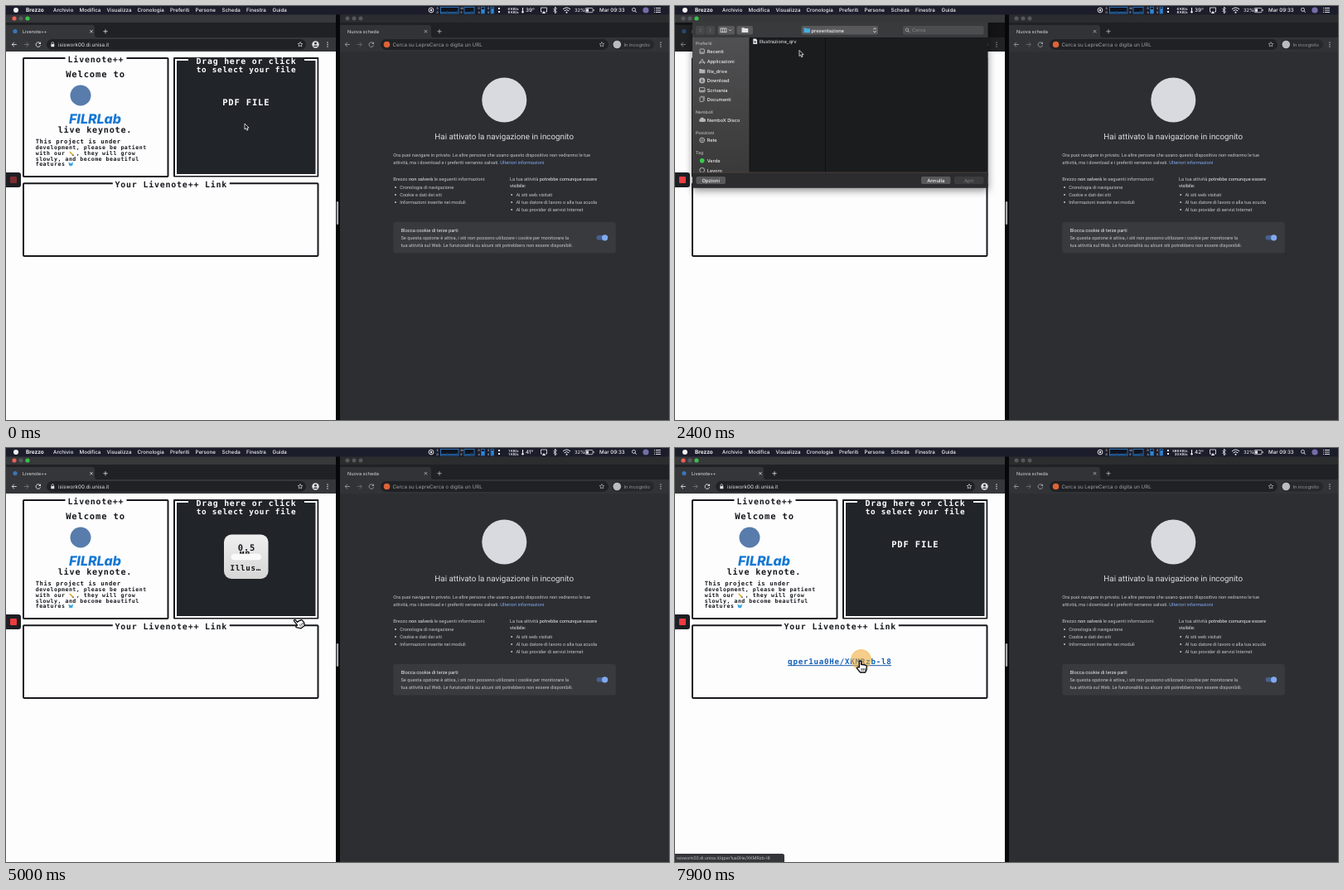
These frames come from a looping animation (800 px wide and 500 px high, 8000 ms). An HTML page:

```html
<!DOCTYPE html>
<html lang="it">
<head>
<meta charset="utf-8">
<title>Livenote++</title>
<style>
  html, body { margin: 0; width: 100%; height: 100%; overflow: hidden; background: #000; }
  svg { display: block; width: 800px; height: 500px; }
  text { white-space: pre; text-rendering: geometricPrecision; }
  .ui { font-family: Inter, "Open Sans", sans-serif; }
  .page { font-family: Roboto, Inter, sans-serif; }
  .px { font-family: "DejaVu Sans Mono", "Liberation Mono", monospace; font-weight: 700; letter-spacing: .08em; }
  .slide { font-family: "Liberation Sans", Lato, sans-serif; font-weight: 700; }
  .b { font-weight: 600; }
  .sheet { filter: drop-shadow(0 3px 5px rgba(0, 0, 0, .45)); }
</style>
</head>
<body>
<svg id="stage" viewBox="0 0 800 500"></svg>
<script>
const LOOP = 8000, STEP = 100, INK = '#17191d', TITLE_BAR = '#37383a', OFF = '#55575b';

// Markup helpers
const rect = (x, y, w, h, fill, rx = 0, more = '') =>
  `<rect x="${x}" y="${y}" width="${w}" height="${h}" rx="${rx}" fill="${fill}" ${more}/>`;
const dot = (x, y, r, fill, more = '') => `<circle cx="${x}" cy="${y}" r="${r}" fill="${fill}" ${more}/>`;
const line = (d, color, w = 1, more = '') =>
  `<path d="${d}" fill="none" stroke="${color}" stroke-width="${w}" ${more}/>`;
const shape = (d, fill, more = '') => `<path d="${d}" fill="${fill}" ${more}/>`;
const text = (x, y, size, str, fill, cls = 'ui', more = '') =>
  `<text x="${x}" y="${y}" font-size="${size}" fill="${fill}" class="${cls}" ${more}>${str}</text>`;
const group = (id, body, more = '') => `<g id="${id}" ${more}>${body}</g>`;
const MID = 'text-anchor="middle"', END = 'text-anchor="end"';

const cross = (x, y, c) => line(`M${x - 1.7} ${y - 1.7}l3.4 3.4m0 -3.4l-3.4 3.4`, c, .8);
const plus = (x, y, c) => line(`M${x - 2.6} ${y}h5.2m-2.6 -2.6v5.2`, c, .8);
const arrow = (x, y, dir, c) =>
  line(`M${x - 2.8 * dir} ${y}h${5.6 * dir}m${-2.7 * dir} -2.7l${2.7 * dir} 2.7l${-2.7 * dir} 2.7`, c, .9);
const reload = (x, y, c) =>
  line(`M${x + 2.2} ${y - 1.5}a2.8 2.8 0 1 0 .4 2.3`, c, .9) + shape(`M${x + 3} ${y - 3.2}v2.8h-2.8z`, c);
const dots = (x, y, c) => [-2.4, 0, 2.4].map(d => dot(x, y + d, .75, c)).join('');
const star = (x, y, c) => {
  const pts = [...Array(10).keys()].map(i => {
    const a = i * Math.PI / 5 - Math.PI / 2, r = i % 2 ? 1.4 : 3;
    return `${(x + r * Math.cos(a)).toFixed(2)},${(y + r * Math.sin(a)).toFixed(2)}`;
  });
  return `<polygon points="${pts.join(' ')}" fill="none" stroke="${c}" stroke-width=".7"/>`;
};
const lens = (x, y, c, r = 2) => dot(x, y, r, 'none', `stroke="${c}" stroke-width=".8"`) +
  line(`M${x + r * .7} ${y + r * .7}l1.9 1.9`, c, .9);

function menuBar() {
  const items = [[57, 'Archivio'], [88.5, 'Modifica'], [121.5, 'Visualizza'], [158.5, 'Cronologia'], [198, 'Preferiti'],
    [228.5, 'Persone'], [260.5, 'Scheda'], [290, 'Finestra'], [321.5, 'Guida']];
  const w = '#f2f2f4', blue = '#2e86d8', med = 'font-weight="500"';
  const label = (x, y, s) => text(x, y, 3.4, s, w);
  return rect(0, 0, 800, 10.5, '#1b1d2b') + dot(12, 5, 3, w) +
    text(24, 7.4, 6.5, 'Brezzo', w, 'ui', 'font-weight="700"') +
    items.map(([x, s]) => text(x, 7.4, 6.2, s, w, 'ui', med)).join('') +
    dot(513, 5, 2.9, 'none', `stroke="${w}" stroke-width=".9"`) + dot(513, 5, 1.2, w) +
    label(519.5, 4.4, 'S') + label(519.5, 8.6, 'D') +
    rect(524.5, 1.5, 21.5, 7.5, '#10141f', 0, `stroke="${blue}" stroke-width=".8"`) +
    line('M525 8l3-.6 2 .5 3-1 2 1 3-.5 3 .4 4-.8', blue, .8) +
    label(548.5, 4.4, 'M') + label(548.5, 8.6, 'E') +
    rect(553, 1.5, 12, 7.5, '#10141f', 0, `stroke="${blue}" stroke-width=".8"`) + line('M554 7.8h6l2-1 2 .8', blue, .8) +
    rect(573.5, 1.5, 4, 7.5, '#10141f', 0, `stroke="${blue}" stroke-width=".7"`) + rect(574, 4, 3, 4.8, blue) +
    label(569.5, 4.4, 'R') + label(569.5, 8.6, 'A') +
    label(581, 4.4, 'S') + label(581, 8.6, 'S') + rect(585, 1.5, 3.5, 7.5, '#10141f', 0, `stroke="${blue}" stroke-width=".7"`) +
    rect(585.4, 3, 2.7, 5.8, blue) + rect(594, 2, 2, 2, w) + rect(594, 6, 2, 2, w) +
    text(618.5, 4.5, 4.1, '', w, 'ui b', END + ' id="up"') + text(618.5, 9, 4.1, '', w, 'ui b', END + ' id="down"') +
    dot(623.5, 7.2, 1.2, w) + line('M623.5 2v5', w, 1.1) + text(627, 7.4, 6.3, '', w, 'ui', med + ' id="temp"') +
    line('M647 7h-1.5v-5h7v5h-1.5', w, .8) + shape('M646.8 9l2.2-3 2.2 3z', w) +
    line('M660.5 3l4 4-2 2v-8l2 2-4 4', w, .8) +
    line('M672 4q4.5-4 9 0m-7.4 1.8q2.9-2.4 5.8 0', w, 1) + dot(676.5, 7.8, 1, w) +
    text(686, 7.4, 5.8, '32%', w) + rect(699, 2.5, 9, 5.2, 'none', 1, `stroke="${w}" stroke-width=".7"`) +
    rect(700, 3.5, 3, 3.2, w) + rect(708.7, 4.2, .9, 1.8, w) +
    text(716, 7.4, 6.2, 'Mar 09:33', w, 'ui', med) + lens(757.5, 4.4, w) +
    dot(772, 5, 3.6, '#746ea8') + line('M782 2.5h1m1 0h6m-8 2.5h1m1 0h6m-8 2.5h1m1 0h6', w, .9);
}

function leftChrome() {
  const c = '#dfe1e5';
  return rect(0, 20, 398, 18, '#202124') + rect(0, 10, 398, 10, TITLE_BAR) +
    shape('M0 38V23h104q3 0 3 4v8q0 3 3 3z', '#35363a') + rect(0, 38, 398, 17, '#35363a') +
    dot(10, 15, 2.6, '#ed5f57', 'id="closeLight"') + dot(18, 15, 2.6, OFF) + dot(26, 15, 2.6, '#38c149') +
    dot(11, 30.5, 2.6, '#3b76b8') + text(20, 33, 5.5, 'Livenote++', c) + cross(103, 30.7, c) + plus(120, 30.7, c) +
    rect(49, 40, 313, 13, '#202124', 6.5) + arrow(10, 46.5, -1, c) + arrow(24.5, 46.5, 1, '#75777b') + reload(39, 46.5, c) +
    rect(54.3, 46, 4, 3.2, c, .5) + line('M55.1 46v-1.2a1.2 1.2 0 0 1 2.4 0v1.2', c, .7) +
    text(63, 48.9, 6.2, 'isiswork00.di.unisa.it', c) + star(355, 46.5, c) +
    dot(373.5, 46.5, 4.2, c) + dot(373.5, 45.2, 1.4, '#35363a') + shape('M370.8 49a2.8 2.2 0 0 1 5.4 0z', '#35363a') +
    dots(388, 46.5, c);
}

function leftPage() {
  const para = ['This project is under', 'development, please be patient', 'with our   , they will grow',
    'slowly, and become beautiful', 'features'];
  const frame = (x, y, w, h) => rect(x, y, w, h, 'none', .8, `stroke="${INK}" stroke-width="2"`);
  const head = (x, y, w, s) => rect(x - w / 2, y - 5, w, 9, '#fdfdfe') + text(x, y + 3.3, 9.95, s, INK, 'px', MID);
  return rect(0, 55, 398, 445, '#fdfdfe') +
    frame(21, 63, 174.5, 143) + head(108.5, 64.5, 74, 'Livenote++') +
    text(108, 85.5, 10.5, 'Welcome to', INK, 'px', MID) + dot(90, 108, 12.5, '#587cab') +
    text(107.5, 142, 16, 'FILRLab', '#1477d4', 'ui', MID + ' font-weight="800" font-style="italic"') +
    text(107.5, 152.5, 10.1, 'live keynote.', INK, 'px', MID) +
    para.map((s, i) => text(35.7, 166.4 + i * 6.7, i ? 6.55 : 7.2, s, INK, 'px')).join('') +
    line('M77 176l3.6 4', '#e3a72e', 1.7) + dot(81, 180.2, .8, '#3d3427') +
    shape('M75.5 188.5l2.7 1.8 2.7-1.8-.5 3.8-1.5 1.2-.7-1-.7 1-1.5-1.2z', '#36a5df') +
    rect(202, 62, 175.3, 144.5, INK, .8) + rect(205, 65, 169.5, 139, '#212429', 0, 'stroke="#fdfdfe" stroke-width="2"') +
    rect(220, 62, 140, 20, '#212429') +
    text(290, 70.4, 9.85, 'Drag here or click', '#fff', 'px', MID) +
    text(290, 79.7, 9.3, 'to select your file', '#fff', 'px', MID) +
    group('pdf', text(289.8, 120.3, 10.5, 'PDF FILE', '#fff', 'px', MID)) +
    group('tile',
      rect(263, 104.5, 53.5, 53.5, 'url(#tileFill)', 9) + text(290.5, 123.5, 10.4, '0.5', '#15171a', 'px', MID) +
      text(288.5, 132, 9.8, 'MB', '#15171a', 'px', MID) + rect(271.5, 127.7, 36.5, 7.6, '#fafafa', 3.8) +
      text(289.3, 147.5, 9.2, 'Illus…', '#15171a', 'px', MID)) +
    frame(21, 214.3, 355.5, 87.6) + head(199.3, 216, 141, 'Your Livenote++ Link') +
    group('link', text(198.8, 261, 9.2, 'qper1ua0He/XKMRzb-l8', '#1684e2', 'px', MID + ' id="linkText"') +
      line('M136 262.7h125', '#1254a5', 1, 'id="underline"')) +
    group('status', rect(-3, 490, 135, 13, '#35363a', 2.5) +
      text(2, 497, 5.2, 'isiswork00.di.unisa.it/qper1ua0He/XKMRzb-l8', '#bdc1c6')) +
    group('record', shape('M0 201h15q3 0 3 3v12q0 3-3 3h-15z', '#1d1f24') + rect(5, 206, 8, 8, '#ee3b3f', 1, 'id="recordMark"'));
}

function rightWindow() {
  const c = '#b5b8bd', t = '#c3c5ca';
  const p = (x, y, s, more = '') => text(x, y, 5.68, s, t, 'page', more);
  const bullets = (x, y, list) => list.map((s, i) => dot(x, y - 2 + i * 9, 1, t) + p(x + 5.2, y + i * 9, s)).join('');
  return rect(403, 10, 397, 490, '#2d2e32') + rect(403, 20, 397, 18, '#202124') + rect(403, 10, 397, 10, '#2b2c2e') +
    shape('M403 38V23h107q3 0 3 4v8q0 3 3 3z', '#323337') + rect(403, 38, 397, 17, '#323337') +
    [412, 420, 428].map(x => dot(x, 15, 2.5, OFF)).join('') +
    text(412, 33, 5.6, 'Nuova scheda', '#d6d8dc') + cross(506.5, 30.7, c) + plus(523, 30.7, c) +
    arrow(412, 46.5, -1, '#9a9da2') + arrow(426.5, 46.5, 1, '#696b70') + reload(441, 46.5, '#9a9da2') +
    rect(452, 40, 275, 13, '#202124', 6.5) + dot(459.5, 46.5, 3.8, '#de6236') +
    text(466.5, 48.9, 6.2, 'Cerca su LepreCerca o digita un URL', '#9ea1a6') + star(719, 46.5, c) +
    rect(731, 40.5, 51, 12, '#27282b', 6) + dot(737.3, 46.5, 4.8, '#b9bcc1') +
    text(745.5, 48.7, 5.7, 'In incognito', '#94979c') + dots(790, 46.5, c) +
    dot(601.3, 113.5, 27, '#d8dadf') +
    text(601.2, 161.2, 9.8, 'Hai attivato la navigazione in incognito', '#dcdee2', 'page', MID) +
    p(467.3, 182, 'Ora puoi navigare in privato. Le altre persone che usano questo dispositivo non vedranno le tue') +
    p(467.3, 190.8, 'attività, ma i download e i preferiti verranno salvati. <tspan fill="#82aaf0">Ulteriori informazioni</tspan>') +
    p(467.3, 210.5, 'Brezzo <tspan font-weight="500">non salverà</tspan> le seguenti informazioni:') +
    bullets(470, 221, ['Cronologia di navigazione', 'Cookie e dati dei siti', 'Informazioni inserite nei moduli']) +
    p(608, 210.5, 'La tua attività <tspan font-weight="500">potrebbe comunque essere</tspan>') +
    p(608, 219.2, 'visibile:', 'font-weight="500"') +
    bullets(610.2, 230, ['Ai siti web visitati', 'Al tuo datore di lavoro o alla tua scuola', 'Al tuo provider di servizi Internet']) +
    rect(467.3, 261, 268.5, 37.5, '#393a3e', 3) + text(476.5, 273, 5.75, 'Blocca cookie di terze parti', '#e6e8eb', 'page') +
    p(476.5, 282, 'Se questa opzione è attiva, i siti non possono utilizzare i cookie per monitorare la') +
    p(476.5, 290.8, 'tua attività sul Web. Le funzionalità su alcuni siti potrebbero non essere disponibili.') +
    rect(712.5, 277, 13, 5.6, '#45618f', 2.8) + dot(722.6, 279.8, 3.6, '#82aaf0');
}

function sidebar() {
  const heads = [[47, 'Preferiti'], [130, 'NemboX'], [154.5, 'Posizioni'], [179, 'Tag']];
  const rows = [[57.2, 'Recenti'], [69, 'Applicazioni'], [80.5, 'file_drive'], [92.2, 'Download'], [103.7, 'Scrivania'],
    [115.3, 'Documenti'], [140, 'NemboX Disco'], [164.3, 'Rete'], [189, 'Verde'], [200.5, 'Lavoro']];
  const g = '#b4b4b5', ring = y => dot(32.7, y, 2.9, 'none', `stroke="${g}" stroke-width="1"`);
  return rect(21, 38, 69, 163, 'url(#sideFill)') + rect(21, 38, 69, 163, '#1d1c1b', 0, 'id="shade"') +
    heads.map(([y, s]) => text(25, y, 5.1, s, '#b0b0b1', 'ui b')).join('') +
    rows.map(([y, s]) => text(38.7, y, 5.6, s, '#f0f0f1', 'ui', 'font-weight="500"')).join('') +
    rect(30, 52, 5.4, 5.4, 'none', .8, `stroke="${g}"`) + line('M30 56h5.4', g) +
    line('M29.5 70l3.2-6 3.2 6m-7-2h7.6', g, 1) + shape('M29.3 76h2.5l.8.8h3.7v4.5h-7z', g) +
    dot(32.7, 90, 3.6, g) + line('M32.7 88v3.6m-1.6-1.4l1.6 1.6 1.6-1.6', '#454547', .9) +
    rect(29.5, 98.7, 6.4, 5.2, 'none', .6, `stroke="${g}"`) + line('M29.5 102.5h6.4', g, 1.4) +
    rect(30, 110, 4.2, 5.5, 'none', .4, `stroke="${g}" stroke-width=".9"`) + line('M31 109.2h4.4v5.3', g, .7) +
    shape('M30.6 140a2 2 0 0 1-.2-3.8a2.5 2.5 0 0 1 4.7-.2a2 2 0 0 1 .1 4z', g) +
    ring(162) + line('M29.8 162h5.8m-2.9-2.9v5.8', g, .6) + dot(32.7, 186.7, 2.8, '#35cf4e') + ring(198.3);
}

function preview() {
  const rel = (y, s, bold) => text(325.5, y, 3, s, '#15171c', 'slide', END + (bold ? '' : ' style="font-weight:400"'));
  const info = (y, k, v) => text(191, y, 5.3, k, '#a6a7a9') + text(368, y, 5.3, v, '#eeeef0', 'ui', END + ' font-weight="500"');
  const date = 'Martedì 10 settembre 2019 10:34';
  return rect(223.5, 47.5, 112, 84, '#fff') + dot(244, 60.5, 6, '#3d78bb') + dot(279.5, 60.5, 7.3, '#111') +
    dot(314.5, 60.5, 7.3, '#c5823b') +
    text(227, 77.2, 4.75, 'METODI DI OSSERVAZIONE FATTI SU', '#15171c', 'slide') +
    text(227, 83.2, 4.75, 'GRAFI PER', '#15171c', 'slide') + line('M227 86.3h104', '#c6c9cf', .4) +
    text(227, 102, 12.4, 'ALGA', '#2864c8', 'slide') +
    rel(109.3, 'Primo Relatore:', true) + rel(113.2, 'Prof. Oreste Valli') +
    rel(119.2, 'Secondo Relatore:', true) + rel(123.2, 'Fausto Bernardini') +
    text(191, 150, 7.3, 'Illustrazione_qrv', '#f1f1f3', 'ui b') + text(191, 159, 5.4, 'PDF - 477 KB', '#a6a7a9') +
    text(191, 173, 6.2, 'Informazioni', '#f1f1f3', 'ui b') + text(367.5, 173, 5.5, 'Mostra altro', '#2b76e8', 'ui', END) +
    line('M191 177h177', '#424347', .6) + info(185, 'Creato', date) + info(194, 'Modificato', date) +
    info(202.6, 'Ultima apertura', date);
}

function sheet() {
  const btn = (x, y, w, h, fill = '#59595b') => rect(x, y, w, h, fill, 2);
  const label = (x, s, c, more = '') => text(x, 212.7, 5.9, s, c, 'ui', MID + ' font-weight="500" ' + more);
  return rect(21, 19, 356.5, 200.5, '#1b1c1e', 2) + rect(21, 19, 356.5, 19.5, '#393a3c') + line('M21 38.5h356', '#111', .7) +
    btn(25, 24, 11, 10.5, '#48484a') + btn(37, 24, 11, 10.5, '#48484a') +
    line('M31.5 27l-2 2.3 2 2.3m10-4.6l2 2.3-2 2.3', '#77777a', .8) +
    btn(52, 24, 20, 10.5) + rect(55, 27, 7, 4.5, 'none', 0, 'stroke="#ddd" stroke-width=".8"') +
    line('M57.3 27v4.5m2.4-4.5v4.5m5.3-3l1.5 1.5 1.5-1.5', '#ddd', .8) +
    btn(74.5, 24, 19.5, 10.5) + shape('M80.5 26.3h3l.8.8h4v5h-7.8z', '#e4e4e5') +
    btn(152.5, 24, 92.5, 10.5) + rect(275, 24, 97.5, 10.5, '#4c4d4f', 2) + lens(280, 28.8, '#b0b0b2', 1.8) +
    text(286, 31.4, 5.8, 'Cerca', '#89898c') +
    group('listing', shape('M155.5 26.5h2.7l.8.8h4v5h-7.5z', '#46aee0') +
      text(164.5, 31.5, 5.8, 'presentazione', '#f2f2f3', 'ui', 'font-weight="500"') +
      line('M239.5 28.4l1.6-1.8 1.6 1.8m-3.2 1.8l1.6 1.8 1.6-1.8', '#e5e5e6', .9) +
      rect(90, 38.8, 91.5, 8, '#1459d6', 0, 'id="selected"') +
      shape('M94.3 39.5h3.2l1.6 1.6v4.9h-4.8z', '#e8eaed') + rect(95.2, 42.2, 2.8, 2.5, '#74797f') +
      text(101.7, 44.8, 5.8, 'Illustrazione_qrv', '#f2f2f3')) +
    sidebar() + line('M90 38.5v163m91.5-163v163', '#0c0d0e', .8) + group('preview', preview()) +
    rect(21, 201, 356.5, 18.5, '#2c2c2e') + line('M21 201h356', '#5a4a46', .7) +
    btn(25.5, 206, 35.5, 9) + label(43.2, 'Opzioni', '#f1f1f2') + btn(297, 206, 35.5, 9) + label(314.7, 'Annulla', '#f1f1f2') +
    rect(337, 206, 35.5, 9, '#3c3c3e', 2, 'id="openButton"') + label(354.7, 'Apri', '#77777a', 'id="openLabel"');
}

function cursors() {
  const hand = 'M3.2 8V1.2Q4.3-.3 5.4 1.2V5Q6.7 4.1 7.6 5.2Q9 4.4 9.8 5.6Q11.4 5.2 11.7 6.8V10.5L10.2 13.8H4.4L.5 9.2Q.2 7.2 3.2 8z';
  const pose = (scale, turn = 0) => `transform="rotate(${turn}) scale(${scale}) translate(-4.3 0)"`;
  const edge = w => `stroke="#08090a" stroke-width="${w}" stroke-linejoin="round"`;
  const big = shape(hand, '#fff', edge(1.3)) + line('M5.8 9v3m2-3v3m2-3v3', '#08090a', .8);
  return group('cursor', dot(1, -1, 12, '#f0a52c', 'id="halo" fill-opacity=".55" stroke="#f4bd4d" stroke-width=".7"') +
    group('arrow', shape('M0 0v7l1.6-1.4 1.1 2.6 1.3-.6-1.1-2.5h2.2z', '#111', 'stroke="#f5f5f5" stroke-width=".8"')) +
    group('hand', shape(hand, '#fff', edge(1.4)), pose(.58)) +
    group('tilted', big, pose(.98, -38)) + group('big', big, pose(1.05)));
}

const stage = document.getElementById('stage');
stage.innerHTML = `<defs>
  <linearGradient id="tileFill" x2="0" y2="1"><stop stop-color="#efefef"/><stop offset="1" stop-color="#d6d6d6"/></linearGradient>
  <linearGradient id="sideFill" x2="0" y2="1"><stop stop-color="#505052"/><stop offset="1" stop-color="#3b3a3a"/></linearGradient>
  <clipPath id="under"><rect y="20" width="398" height="480"/></clipPath></defs>` +
  rect(0, 0, 800, 500, '#08080a') + leftPage() + leftChrome() + rightWindow() +
  rect(398.8, 236, 2.4, 28, '#a9a9ab', 1.2) + rect(0, 20, 398, 35, '#000', 0, 'id="dim" opacity=".38"') +
  `<g clip-path="url(#under)">${group('sheet', sheet(), 'class="sheet"')}</g>` + menuBar() + cursors();

const $ = Object.fromEntries([...stage.querySelectorAll('[id]')].map(e => [e.id, e]));

// Timeline
const path = [[0, 288, 142], [1900, 288, 142], [2300, 150, 53.5], [2700, 150, 53.5], [2900, 134, 43], [3200, 134, 43],
  [3700, 347, 205], [4700, 347, 205], [5200, 348, 208.5], [5600, 348, 208.5], [6300, 312, 159.5], [6800, 312, 159.5],
  [7300, 223.5, 256.5], [LOOP, 223.5, 256.5]];
const clicks = [[900, 1200], [2900, 3200], [3900, 4300], [7700, LOOP]];
const looks = [[0, 'arrow'], [600, 'hand'], [1900, 'arrow'], [4800, 'tilted'], [5700, 'hand'], [7300, 'big']];
const meters = [[0, '6 KB/s', '8 KB/s', '39°'], [3200, '1 KB/s', '1 KB/s', '41°'], [5900, '588 KB/s', '30 KB/s', '42°']];

const within = (t, a, b) => t >= a && t < b;
const show = (el, on) => el.setAttribute('display', on ? 'inline' : 'none');
const latest = (table, t) => table.filter(row => row[0] <= t).pop();
const ramp = (t, a, b) => Math.min(1, Math.max(0, (t - a) / (b - a)));
const smooth = p => p * p * (3 - 2 * p);

function place(t) {
  const i = Math.max(1, path.findIndex(k => k[0] > t));
  const [a, x, y] = path[i - 1], [b, u, v] = path[i], p = smooth(ramp(t, a, b));
  return [x + (u - x) * p, y + (v - y) * p];
}

function draw(t) {
  const opened = 1 - (1 - ramp(t, 1400, 1800)) ** 2, closed = ramp(t, 4600, 5000) ** 2;
  const sheetUp = within(t, 1400, 5000), chosen = t >= 3000, hover = t >= 7200, uploading = within(t, 5000, 6000);
  $.sheet.setAttribute('transform', `translate(0 ${-180 * (1 - opened + closed)})`);
  show($.sheet, sheetUp);
  show($.dim, within(t, 1800, 4800));
  $.closeLight.setAttribute('fill', sheetUp ? OFF : '#ed5f57');
  $.shade.setAttribute('opacity', .7 * (1 - ramp(t, 1600, 2000)));
  show($.listing, t >= 1900);
  show($.selected, chosen);
  show($.preview, t >= 3200);
  $.openButton.setAttribute('fill', chosen ? '#1459d6' : '#3c3c3e');
  $.openLabel.setAttribute('fill', chosen ? '#fff' : '#77777a');

  show($.tile, uploading);
  show($.pdf, !uploading);
  show($.link, t >= 6000);
  show($.underline, hover);
  show($.status, hover);
  $.linkText.setAttribute('fill', hover ? '#1260b8' : '#1684e2');
  $.recordMark.setAttribute('opacity', t < 500 ? .45 : 1);

  const [, up, down, temp] = latest(meters, t);
  $.up.textContent = up;
  $.down.textContent = down;
  $.temp.textContent = temp;

  const look = latest(looks, t)[1];
  ['arrow', 'hand', 'tilted', 'big'].forEach(id => show($[id], id === look));
  show($.halo, clicks.some(([a, b]) => within(t, a, b)));
  $.cursor.setAttribute('transform', `translate(${place(t)})`);
}

const start = performance.now();
function tick() {
  draw(Math.floor((performance.now() - start) % LOOP / STEP) * STEP);
  requestAnimationFrame(tick);
}
tick();
</script>
</body>
</html>
```
